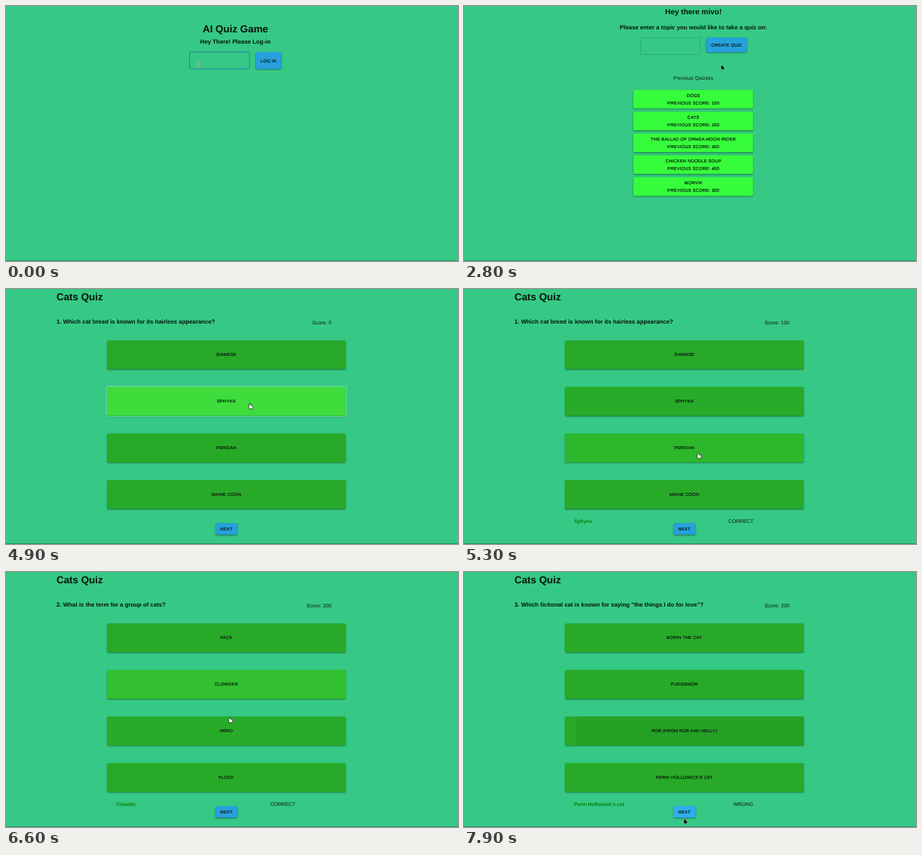
An HTML page with a canvas that plays this animation: 600 px wide and 339 px high, repeating every 8 s.

```html
<!DOCTYPE html>
<html lang="en">
<head>
<meta charset="utf-8">
<title>Quiz Game</title>
<style>
  html, body { margin: 0; width: 100%; height: 100%; overflow: hidden; background: #36c985; }
  canvas { display: block; width: 600px; height: 339px; }
</style>
</head>
<body>
<canvas id="stage"></canvas>
<script>
const W = 600, H = 339, LOOP = 8000, STEP = 100;
const canvas = document.getElementById('stage');
const ctx = canvas.getContext('2d');
const dpr = window.devicePixelRatio || 1;
canvas.width = W * dpr;
canvas.height = H * dpr;

const BG = '#36c985', INK = '#06140c';
const BLUE = '#27a0dc', BLUE_HOT = '#32b4f8';
const LIME = '#37fc3b', LIME_HOT = '#70e846';
const GREEN = '#28aa28', GREEN_HOT = '#3fdc3c';

// Type sizes follow from one root size
const BASE = 6.69, LABEL = BASE * 0.875, H3 = BASE * 1.17, H2 = BASE * 1.5, H1 = BASE * 2;
const MID = 304.5, QUIZ_MID = 292.5;
const USER = 'mivo';

const HOME_AT = 2200, QUIZ_AT = 4000;

const box = (x, y, w, h) => ({ x, y, w, h });
const loginBox = box(331.5, 61, 34, 22.7);
const createBox = box(321.5, 42, 54, 19.4);
const nextBox = box(278, 311.2, 29.4, 15.4);
const topicBox = i => box(224.8, 111.4 + i * 29.05, 159, 24.8);
const optionBox = i => box(134.2, 68.4 + i * 61.9, 316.8, 38.2);

const previous = [
  { name: 'DOGS', score: 100 },
  { name: 'CATS', score: 200 },
  { name: 'THE BALLAD OF ORMEA MOON RIDER', score: 400 },
  { name: 'CHICKEN NOODLE SOUP', score: 400 },
  { name: 'MORVIK', score: 300 }
];

// press: a choice is clicked; shown: the result appears; done: the pointer is back on NEXT
const questions = [
  { from: QUIZ_AT, press: 4800, shown: 5000, done: 5750, pick: 1, x: 325, before: 0, after: 100,
    text: '1. Which cat breed is known for its hairless appearance?',
    options: ['SIAMESE', 'SPHYNX', 'PERSIAN', 'MAINE COON'], answer: 'Sphynx' },
  { from: 6000, press: 6400, shown: 6500, done: 6900, pick: 1, x: 300, before: 100, after: 200,
    text: '2. What is the term for a group of cats?',
    options: ['PACK', 'CLOWDER', 'HERD', 'FLOCK'], answer: 'Clowder' },
  { from: 7000, press: 7400, shown: 7500, done: 7700, pick: 2, x: 310, before: 200, after: 200,
    text: '3. Which fictional cat is known for saying "the things I do for love"?',
    options: ['BORIN THE CAT', 'PUDGEMOR', 'ROB (FROM ROB AND NELLY)', "PERIN HOLLOWICK'S CAT"],
    answer: "Perin Hollowick's cat" }
];

const move = (from, to, x, y) => ({ from, to, x, y });
const moves = [
  move(0, 200, 313, 78),
  move(1200, 1500, 345, 79),
  move(HOME_AT, 3000, 342, 83),
  move(3100, 3850, 327.5, 149.5),
  ...questions.flatMap(q => [
    move(q.from, q.press - 100, q.x, optionBox(q.pick).y + 25.5),
    move(q.shown, q.done, 293, 320)
  ]),
  move(7800, 7900, 293.5, 332)
];

function pointer(t) {
  let x = 255.5, y = 78;
  for (const m of moves) {
    const k = Math.min(1, Math.max(0, (t - m.from) / (m.to - m.from)));
    x += (m.x - x) * k;
    y += (m.y - y) * k;
  }
  return { x, y };
}

function inside(p, r) {
  const y = p.y - 3;
  return p.x > r.x && p.x < r.x + r.w && y > r.y && y < r.y + r.h;
}

// Share of the last 250 ms spent over a box, eased
function hover(t, r) {
  let n = 0;
  for (let k = 0; k < 6; k++) if (inside(pointer(t - k * 50), r)) n++;
  return (n / 6) ** 2;
}

function text(str, x, y, size, { bold = false, align = 'center', space = 0, color = INK } = {}) {
  ctx.font = `${bold ? 'bold ' : ''}${size}px "Liberation Sans", Arial, sans-serif`;
  ctx.textRendering = 'geometricPrecision';
  ctx.letterSpacing = `${space * size}px`;
  ctx.textAlign = align;
  ctx.fillStyle = color;
  ctx.fillText(str, x, y + size * 0.36);
}

function label(str, x, y) {
  text(str, x, y, LABEL, { space: 0.0286 });
  ctx.lineWidth = 0.15;
  ctx.strokeStyle = INK;
  ctx.strokeText(str, x, y + LABEL * 0.36);
}

function rounded(r, radius, grow = 0) {
  ctx.beginPath();
  ctx.roundRect(r.x - grow, r.y - grow, r.w + 2 * grow, r.h + 2 * grow, radius);
}

function button(r, color, hot, level, ring = false) {
  ctx.save();
  ctx.shadowColor = 'rgba(0,0,0,.45)';
  ctx.shadowBlur = 2 * dpr;
  ctx.shadowOffsetY = 0.9 * dpr;
  rounded(r, 1.7);
  ctx.fillStyle = color;
  ctx.fill();
  ctx.restore();
  ctx.globalAlpha = level;
  ctx.fillStyle = hot;
  ctx.fill();
  ctx.globalAlpha = 1;
  if (!ring) return;
  rounded(r, 2.4, 0.9);
  ctx.strokeStyle = 'rgba(160,245,195,.8)';
  ctx.lineWidth = 0.8;
  ctx.stroke();
}

function field(x, y, focused) {
  rounded(box(x, y, 79.5, 22.6), 1.7);
  ctx.strokeStyle = focused ? '#1f7ea8' : 'rgba(0,0,0,.3)';
  ctx.lineWidth = focused ? 0.95 : 0.5;
  ctx.stroke();
}

function drawLogin(t) {
  const pressed = t >= 2000;
  text('AI Quiz Game', MID, 29.7, H1, { bold: true });
  text('Hey There! Please Log-in', MID, 47.2, H3, { bold: true });
  field(243.7, 61, !pressed);
  const typed = USER.slice(0, Math.max(0, (t - 900) / 100));
  text(typed, 249.4, 72.5, BASE, { align: 'left' });
  const blink = typed || (t >= 100 && t < 600);
  if (blink && !pressed) ctx.fillRect(249.4 + ctx.measureText(typed).width, 68.5, 0.6, 8);
  button(loginBox, BLUE, BLUE_HOT, pressed ? 1 : 0);
  label('LOG IN', 348.5, 72.5);
}

function drawHome(t) {
  text(`Hey there ${USER}!`, MID, 7.2, H2, { bold: true });
  text('Please enter a topic you would like to take a quiz on:', MID, 28.2, H3, { bold: true });
  field(234.3, 42, false);
  button(createBox, BLUE, BLUE_HOT, 0);
  label('CREATE QUIZ', 348.5, 51.6);
  text('Previous Quizzes', MID, 95.5, BASE, { space: 0.0094 });
  previous.forEach(({ name, score }, i) => {
    const r = topicBox(i);
    button(r, LIME, LIME_HOT, hover(t, r), i === 1 && t >= 3900);
    label(name, MID, r.y + 7.4);
    label(`PREVIOUS SCORE: ${score}`, MID, r.y + 17.2);
  });
}

function drawQuiz(t, q) {
  const shown = t >= q.shown, correct = q.after > q.before;
  text('Cats Quiz', 67, 10.2, H1, { bold: true, align: 'left' });
  text(q.text, 67, 42.8, H3, { bold: true, align: 'left' });
  text(`Score: ${shown ? q.after : q.before}`, 432, 44.2, BASE, { align: 'right', space: 0.0094 });
  q.options.forEach((name, i) => {
    const r = optionBox(i), picked = i === q.pick;
    button(r, GREEN, GREEN_HOT, correct ? hover(t, r) : 0, picked && t >= q.press && !shown);
    if (picked && !correct && t >= q.shown + 300) {
      ctx.fillStyle = '#25a126';
      ctx.fillRect(149, r.y, r.x + r.w - 149, r.h);
    }
    label(name, QUIZ_MID, r.y + 18.8);
  });
  if (shown) {
    text(q.answer, 146, 308.7, BASE, { bold: true, align: 'left', color: '#058005' });
    text(correct ? 'CORRECT' : 'WRONG', 384, 308.7, BASE, { align: 'right' });
  }
  button(nextBox, BLUE, BLUE_HOT, Math.sqrt(hover(t, nextBox)));
  label('NEXT', QUIZ_MID, 319);
}

function drawArrow({ x, y }) {
  ctx.beginPath();
  ctx.moveTo(x - 0.8, y - 3.2);
  ctx.lineTo(x - 0.8, y + 2.2);
  ctx.lineTo(x + 2.9, y + 0.8);
  ctx.closePath();
  ctx.moveTo(x + 0.6, y + 1);
  ctx.lineTo(x + 1.6, y + 3);
  ctx.lineWidth = 1.4;
  ctx.strokeStyle = 'rgba(255,255,255,.6)';
  ctx.stroke();
  ctx.lineWidth = 0.8;
  ctx.strokeStyle = ctx.fillStyle = '#000';
  ctx.stroke();
  ctx.fill();
}

function drawHand({ x, y }) {
  ctx.beginPath();
  ctx.roundRect(x - 1.8, y - 3.4, 1.4, 5, 0.7);
  ctx.roundRect(x - 2.4, y - 0.8, 4.8, 4, 1.2);
  ctx.lineWidth = 1.4;
  ctx.strokeStyle = '#0a2412';
  ctx.stroke();
  ctx.fillStyle = '#f4fff6';
  ctx.fill();
}

function drawBeam({ x, y }) {
  ctx.beginPath();
  ctx.moveTo(x, y - 3.8);
  ctx.lineTo(x, y + 3.8);
  for (const end of [y - 3.8, y + 3.8]) {
    ctx.moveTo(x - 1.5, end);
    ctx.lineTo(x + 1.5, end);
  }
  ctx.strokeStyle = 'rgba(225,255,240,.85)';
  ctx.lineWidth = 1.7;
  ctx.stroke();
  ctx.strokeStyle = '#1c3d30';
  ctx.lineWidth = 0.6;
  ctx.stroke();
}

function drawPointer(t) {
  const p = pointer(t);
  const targets = [nextBox, ...previous.slice(1).map((_, i) => optionBox(i))];
  if (t < HOME_AT && p.x < 323) drawBeam(p);
  else if (t >= QUIZ_AT && targets.some(r => inside(p, r))) drawHand(p);
  else drawArrow(p);
}

function render(t) {
  ctx.setTransform(dpr, 0, 0, dpr, 0, 0);
  ctx.fillStyle = BG;
  ctx.fillRect(0, 0, W, H);
  ctx.fillStyle = '#21946a';
  ctx.fillRect(0, H - 1, W, 1);
  if (t < HOME_AT) drawLogin(t);
  else if (t < QUIZ_AT) drawHome(t);
  else drawQuiz(t, questions.findLast(q => t >= q.from));
  drawPointer(t);
}

const start = performance.now();
function tick() {
  const t = Math.max(0, performance.now() - start) % LOOP;
  render(Math.floor(t / STEP) * STEP);
  requestAnimationFrame(tick);
}
tick();
</script>
</body>
</html>
```
